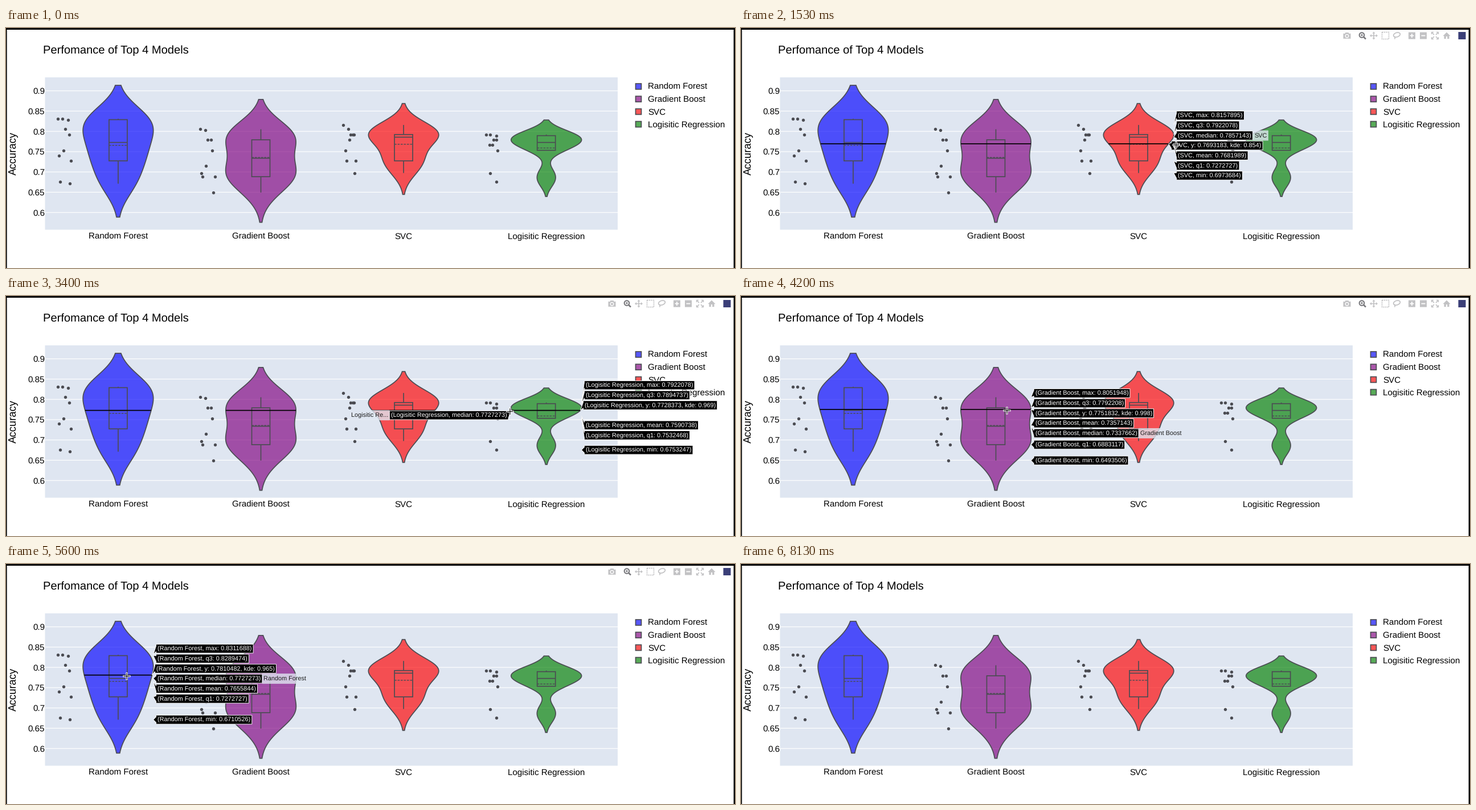
Recreate the animation shown at these times as a matplotlib script. Size 1280 by 423 pixels, loop 8590 ms.

```python
import matplotlib.pyplot as plt
import numpy as np
from matplotlib.animation import FuncAnimation
from matplotlib.patches import Circle, Ellipse, Polygon, Rectangle

W, H, DPI = 1280, 423, 64
PT = 72 / DPI                      # points per pixel
FRAMES, LOOP = 129, 8590
STEP = LOOP / FRAMES
INK, PAPER = "#4b4c52", "#dfe6f1"
LEFT, RIGHT, TOP, BOTTOM = 68.5, 1074, 87, 355.5
HALF, BOX = 61.7, 16               # half widths of violin and box
GAP, TIP, PAD = 17.65, 5, 2.5      # hover label spacing, arrow length, padding
LABEL_PX = 10.85

plt.rcParams["font.family"] = "Liberation Sans"
plt.rcParams["text.hinting"] = "none"
plt.rcParams["path.snap"] = False

fig = plt.figure(figsize=(W / DPI, H / DPI), dpi=DPI, facecolor="white")
ax = fig.add_axes([0, 0, 1, 1])
ax.set(xlim=(0, W), ylim=(H, 0))
ax.axis("off")
renderer = fig.canvas.get_renderer()


def ypos(v):
    return 110.7 + (0.9 - v) * 715


def text(x, y, s, px, z=2, **kw):
    """Text whose baseline sits at y."""
    kw = {"va": "baseline", "color": "black", **kw}
    return ax.text(x, y, s, fontsize=px * PT, zorder=z, **kw)


def line(xs, ys, color=INK, px=1.7, z=3, **kw):
    kw = {"solid_capstyle": "butt", **kw}
    return ax.plot(xs, ys, color=color, lw=px * PT, zorder=z, **kw)[0]


def rect(x, y, w, h, color, z=1, **kw):
    return ax.add_patch(Rectangle((x, y), w, h, fc=color, zorder=z,
                                  **{"lw": 0, **kw}))


def spaced_random(n, seed=2_000_000_000):
    """Congruential numbers in 0..1, skipping any too close to the one before."""
    out = []
    while len(out) < n:
        last, seed = seed, (69069 * seed + 1) % 2 ** 32
        if abs(seed - last) >= 2 ** 32 // 10:
            out.append(seed / 2 ** 32)
    return np.array(out)


class Violin:
    """Scores of ten folds: eight of 77 cases and two of 76, given as hits."""

    def __init__(self, index, name, color, hits77, hits76):
        self.name, self.color = name, color
        self.x = 196.9 + 250.6 * index
        s = np.sort(np.r_[np.array(hits77) / 77, np.array(hits76) / 76])
        self.scores = s
        self.low, self.q1, self.q3, self.high = s[0], s[2], s[7], s[9]
        self.median, self.mean = np.median(s), s.mean()
        iqr = self.q3 - self.q1
        self.bw = 1.059 * min(s.std(ddof=1), iqr / 1.349) * len(s) ** -0.2
        self.span = self.low - 2 * self.bw, self.high + 2 * self.bw
        self.whisker = s[s >= self.q1 - 1.5 * iqr][0]
        steps = int(np.ceil(3 * (self.span[1] - self.span[0]) / self.bw))
        self.peak = 1
        self.peak = self.kde(np.linspace(*self.span, steps + 1)).max()

    def kde(self, v):
        d = (np.atleast_1d(v)[:, None] - self.scores) / self.bw
        return np.exp(-d * d / 2).sum(axis=1) / self.peak

    def covers(self, v):
        return self.span[0] <= v <= self.span[1]

    def reach(self, v):
        return HALF * self.kde(v)[0]

    def jitter(self):
        """Sideways scatter, wider where scores crowd together."""
        s, n = self.scores, len(self.scores)
        spread = [s[min(n - 1, i + 5)] - s[max(0, i - 5)] for i in range(n)]
        factor = np.sqrt(min(spread) / np.array(spread))
        return self.x + HALF * (0.6 * factor * (spaced_random(n) - 0.5) - 1.5)

    def draw(self):
        x, grid = self.x, np.linspace(*self.span, 160)
        ys, w = ypos(grid), HALF * self.kde(grid)
        outline = np.column_stack([np.r_[x - w, (x + w)[::-1]],
                                   np.r_[ys, ys[::-1]]])
        ax.add_patch(Polygon(outline, fc=self.color, alpha=0.66, lw=0, zorder=2))
        ax.add_patch(Polygon(outline, fill=False, ec=INK, lw=1.7 * PT, zorder=3))
        top, bottom = ypos(self.q3), ypos(self.q1)
        rect(x - BOX, top, 2 * BOX, bottom - top, "none", 3, ec=INK, lw=1.7 * PT)
        line([x, x], [ypos(self.high), top])
        line([x, x], [bottom, ypos(self.whisker)])
        line([x - BOX, x + BOX], [ypos(self.median)] * 2)
        line([x - BOX, x + BOX], [ypos(self.mean)] * 2, px=1.4,
             dashes=(2.6, 1.3), dash_capstyle="butt")
        ax.scatter(self.jitter(), ypos(self.scores), s=(5.4 * PT) ** 2,
                   color=INK, lw=0, zorder=3)


violins = [
    Violin(0, "Random Forest", "blue", [52, 56, 57, 58, 61, 62, 64, 64], [51, 63]),
    Violin(1, "Gradient Boost", "purple", [50, 53, 53, 55, 58, 60, 60, 62], [53, 61]),
    Violin(2, "SVC", "red", [56, 56, 58, 60, 61, 61, 61, 62], [53, 62]),
    Violin(3, "Logisitic Regression", "green", [52, 58, 59, 59, 60, 60, 61, 61],
           [53, 60]),
]


def draw_chart():
    rect(0, 0, W, 3, "black")
    rect(0, 0, 1.6, H, "black")
    rect(W - 2.4, 0, 2.4, H, "black")
    rect(LEFT, TOP, RIGHT - LEFT, BOTTOM - TOP, PAPER)
    for v in np.arange(12, 19) / 20:
        line([LEFT, RIGHT], [ypos(v)] * 2, "white", 1.2, 1.5)
        text(68, ypos(v) + 5.3, f"{v:g}", 15.1, ha="right")
    text(65, 45, "Perfomance of Top 4 Models", 20.1)
    text(13, 221, "Accuracy", 18.5, rotation=90, ha="center", va="center")
    for i, v in enumerate(violins):
        v.draw()
        text(v.x, 372, v.name, 15.1, ha="center")
        y = 103 + 22.2 * i
        rect(1105.5, y - 5, 10, 10, v.color, 2, alpha=0.66)
        rect(1105.5, y - 5, 10, 10, "none", 3, ec=INK, lw=1.7 * PT)
        text(1127, y + 5.3, v.name, 15.1)


def draw_toolbar():
    """Icon strip at the top right; returns its artists."""
    grey, dark, y, z = "#c2c2c4", "#77777b", 13.5, 2
    signs = [(a, b) for a in (-1, 1) for b in (-1, 1)]
    parts = []

    def stroke(xs, ys, color=grey, px=1.6, **kw):
        parts.append(line(xs, ys, color, px, z, **kw))

    def plus(x, cy, r, color, px, upright=True):
        stroke([x - r, x + r], [cy, cy], color, px)
        if upright:
            stroke([x, x], [cy - r, cy + r], color, px)

    def block(x, dy, w, h, color=grey):
        parts.append(rect(x - w / 2, y + dy - h / 2, w, h, color, z))

    def patch(p):
        p.set_zorder(z)
        parts.append(ax.add_patch(p))

    # camera
    block(1064, 0.8, 13, 9)
    block(1064, -4, 6, 3)
    patch(Circle((1064, y + 0.6), 2.8, fc=grey, ec="white", lw=1.4 * PT))
    # zoom, the active tool
    patch(Circle((1090, y - 1), 4.3, fill=False, ec=dark, lw=2 * PT))
    stroke([1093, 1097], [y + 2, y + 6], dark, 2.6)
    plus(1090, y - 1, 2, dark, 1.3)
    # pan
    plus(1111, y, 5.5, grey, 1.6)
    for a, b in signs:
        d = np.array([a, b]) if a == b else np.array([a, -b])
        axis = d * ([1, 0] if a == b else [0, 1])
        side = axis[::-1] * 2.6
        tip = np.array([1111, y]) + 7 * axis
        patch(Polygon([tip, tip - 3 * axis + side, tip - 3 * axis - side],
                      fc=grey, lw=0))
    # box select
    stroke(1131.5 + 6 * np.array([-1, 1, 1, -1, -1]),
           y + 6 * np.array([-1, -1, 1, 1, -1]),
           dashes=(1.4, 0.8), dash_capstyle="butt")
    # lasso
    patch(Ellipse((1151.5, y - 1.5), 12, 7.5, angle=-18, fill=False, ec=grey,
                  lw=1.7 * PT))
    stroke([1147, 1148.5, 1147.5], [y + 1.5, y + 4, y + 6])
    # zoom in and out
    for x in (1178, 1198):
        block(x, 0, 12, 12)
        plus(x, y, 3.5, "white", 1.8, x == 1178)
    # autoscale
    for a, b in signs:
        far = 1218.5 + 6 * a
        stroke([1218.5 + 1.5 * a, far], [y + 1.5 * b, y + 6 * b])
        stroke([far - 3.5 * a, far, far], [y + 6 * b, y + 6 * b, y + 2.5 * b], px=1.4)
    # home
    patch(Polygon([(1232.5, y + 0.5), (1239, y - 6), (1245.5, y + 0.5)],
                  fc=grey, lw=0))
    block(1239, 2.8, 9, 5.5)
    block(1239, 3.5, 2.4, 4.2, "white")
    block(1266, 0, 13, 13, "#3b3f78")
    return parts


def spread_out(ys):
    """Push sorted positions apart, keeping each cluster centred."""
    groups = []
    for y in ys:
        groups.append((y, 1))
        while len(groups) > 1:
            (a, n), (b, m) = groups[-2:]
            if b - a >= GAP * (n + m) / 2:
                break
            groups[-2:] = [((a * n + b * m) / (n + m), n + m)]
    return [c + GAP * (j - (n - 1) / 2) for c, n in groups for j in range(n)]


def put_text(item, s):
    """Show a string and return its padded width; hidden text has no extent."""
    item.set_visible(True)
    item.set_text(s)
    return item.get_window_extent(renderer).width + 2 * PAD


class HoverLabel:
    def __init__(self, z):
        self.shape = ax.add_patch(Polygon([(0, 0)] * 3, fc="black", ec="white",
                                          lw=0.9 * PT, zorder=z))
        self.text = text(0, 0, "", LABEL_PX, z + 0.05, color="white")

    def show(self, s, x, y, cy, side=1):
        """Arrow tip at (x, y), box centred on cy; returns the box's far edge."""
        w = put_text(self.text, s)
        near, far, h = x + side * TIP, x + side * (TIP + w), 7.8
        self.shape.set_xy([(x, y), (near, cy - 5), (near, cy - h), (far, cy - h),
                           (far, cy + h), (near, cy + h), (near, cy + 5)])
        self.shape.set_visible(True)
        self.text.set_position((min(near, far) + PAD, cy + 3.8))
        return far

    def set_visible(self, on):
        self.shape.set_visible(on)
        self.text.set_visible(on)


draw_chart()
toolbar = draw_toolbar()
levels = [line([0, 0], [0, 0], "black", 1.7, 4) for _ in violins]
labels = [HoverLabel(6 + 0.1 * i) for i in range(7)]
name_box = rect(0, 0, 1, 18, PAPER, 7, alpha=0.8)
name_text = text(0, 0, "", LABEL_PX, 7.1, color="#1c1c1c")
cursor = [line([0, 0], [0, 0], c, w, 9 + i, solid_capstyle="projecting")
          for i, (c, w) in enumerate([("white", 3.2)] * 2 + [("black", 1.1)] * 2)]

# where the pointer rests: time in ms, x, accuracy under it
STOPS = np.array([
    (0, 80, .600), (550, 225, .760), (1530, 764, .7693183), (2300, 715, .782),
    (2850, 925, .768), (3400, 885, .7728373), (4200, 467, .7751832),
    (5000, 440, .757), (5600, 212, .7810482), (6100, 205, .800),
    (6800, 686, .8232758), (7060, 575, .764), (7400, 560, .607),
    (8150, 440, .566)])
REST = 70                          # pause on either side of a stop, ms


def pointer(t):
    i = np.searchsorted(STOPS[:, 0], t, side="right")
    a, b = STOPS[i - 1], STOPS[i]
    u = np.clip((t - a[0] - REST) / (b[0] - a[0] - 2 * REST), 0, 1)
    return a[1:] + (b[1:] - a[1:]) * u * u * (3 - 2 * u)


def show_name(name, x, cy, side):
    w = put_text(name_text, name if len(name) <= 15 else name[:12] + "...")
    left = x if side > 0 else x - w
    name_box.set_bounds(left, cy - 9, w, 18)
    name_box.set_visible(True)
    name_text.set_position((left + PAD, cy + 3.8))


def show_hover(index, v):
    item = violins[index]
    rows = [(item.high, "max"), (item.q3, "q3"), (item.median, "median"),
            (item.mean, "mean"), (item.q1, "q1"), (item.low, "min")]
    if item.covers(v):
        rows.append((v, "y"))
        for violin, level in zip(violins[:index + 1], levels):
            r = violin.reach(v)
            level.set_data([violin.x - r, violin.x + r], [ypos(v)] * 2)
            level.set_visible(violin.covers(v))
    rows.sort(key=lambda row: -row[0])

    anchors = [ypos(value) for value, _ in rows]
    for label, (value, key), y, cy in zip(labels, rows, anchors,
                                          spread_out(anchors)):
        note = f", kde: {item.kde(v)[0]:.3f}" if key == "y" else ""
        reach = item.reach(v) if key == "y" else HALF
        # the last violin has no room on its right for the named label
        side = -1 if key == "median" and index == 3 else 1
        far = label.show(f"({item.name}, {key}: {value:.7f}{note})",
                         item.x + side * reach, y, cy, side)
        if key == "median":
            show_name(item.name, far, cy, side)


def update(k):
    for part in levels + labels + [name_box, name_text]:
        part.set_visible(False)
    active = 1 <= k <= 121
    for part in toolbar + cursor:
        part.set_visible(active)
    if not active:
        return []
    x, v = pointer(k * STEP)
    y = ypos(v) + 2
    for i, arm in enumerate(cursor):
        dx, dy = (0, 5) if i % 2 else (5, 0)
        arm.set_data([x - dx, x + dx], [y - dy, y + dy])
    for i, violin in enumerate(violins):
        if -110 < x - violin.x < 80:
            show_hover(i, v)
    return []


anim = FuncAnimation(fig, update, frames=FRAMES, interval=STEP,
                     init_func=lambda: [], repeat=True, repeat_delay=0, blit=False)
plt.show()
```
